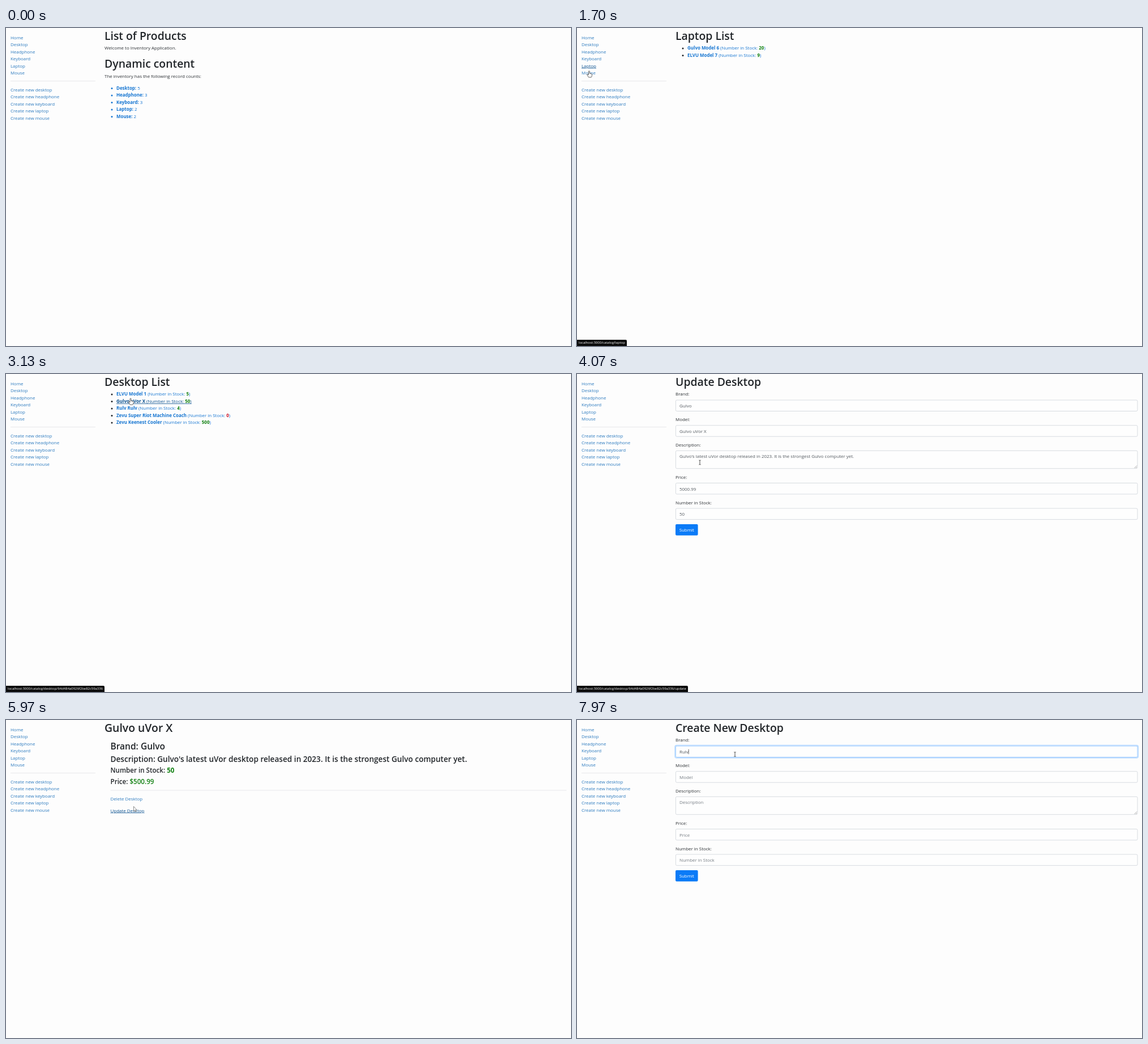
These frames come from a looping animation (998x561 px, 8000 ms). An HTML page:

```html
<!DOCTYPE html>
<html lang="en">
<head>
<meta charset="utf-8">
<title>Inventory</title>
<style>
html, body { margin: 0; width: 100%; height: 100%; overflow: hidden; background: #fdfdfd; }
svg { display: block; width: 100vw; height: 100vh; }
text { font-family: "Open Sans", "Noto Sans", sans-serif; font-size: 7.95px; fill: #2c3034; white-space: pre; }
.h1, .h2, .h3, .h4 { font-weight: 600; fill: #212529; }
.h1 { font-size: 19.4px; }
.h2 { font-size: 15.5px; }
.h3 { font-size: 13.62px; }
.h4 { font-size: 11.6px; }
.nav { fill: #2b7abf; }
.link { fill: #1676d2; }
.hover { fill: #0a5190; text-decoration: underline; }
.value { fill: #53595f; }
.hint { fill: #747b82; }
.b { font-weight: 700; }
.good { fill: #118011; }
.bad { fill: #cc1024; }
.field { fill: #fefefe; stroke: #ced4da; stroke-width: .8; }
.rule { stroke: #e2e3e6; stroke-width: .8; }
#tip { position: absolute; left: 0; bottom: 0; height: 11px; padding: 0 3px; border-radius: 0 2px 0 0;
  background: #0a0a0a; color: #fff; font: 5.93px/11px "Open Sans", "Noto Sans", sans-serif; white-space: pre; }
</style>
</head>
<body>
<svg id="stage" viewBox="0 0 998 561" preserveAspectRatio="none"></svg>
<div id="tip"></div>
<script>
const LOOP = 8000;
const kinds = ["Desktop", "Headphone", "Keyboard", "Laptop", "Mouse"];
const sizes = { h1: 19.4, h2: 15.5, h3: 13.62, h4: 11.6 };
const brand = "Gulvo", model = "Gulvo uVor X";
const about = "Gulvo's latest uVor desktop released in 2023. It is the strongest Gulvo computer yet.";

// Text whose capitals are centred on y.
const text = (x, y, str, cls = "", attrs = "") =>
  `<text x="${x}" y="${y + .355 * (sizes[cls] || 7.95)}" class="${cls}" ${attrs}>${str}</text>`;
const link = (x, y, str, key, cls = "link") => text(x, y, str, cls, `data-key="${key}"`);
const span = (str, cls) => `<tspan class="${cls}">${str}</tspan>`;
const dot = (y, color) => `<circle cx="187" cy="${y + .4}" r="1.5" fill="${color}"/>`;
const rule = (x1, x2, y) => `<path class="rule" d="M${x1} ${y}H${x2}"/>`;

function sidebar() {
  const top = ["Home", ...kinds].map((s, i) => link(8, 17 + 12.45 * i, s, s, "nav"));
  const make = kinds.map((s, i) => link(8, 109 + 12.45 * i, "Create new " + s.toLowerCase(), "new" + s, "nav"));
  return top.join("") + rule(8, 158, 93.6) + make.join("");
}

function home() {
  const counts = [5, 3, 3, 2, 2];
  return text(174, 13.7, "List of Products", "h1") +
    text(174, 35.6, "Welcome to Inventory Application.") +
    text(174, 63.5, "Dynamic content", "h1") +
    text(174, 85.5, "The inventory has the following record counts:") +
    kinds.map((s, i) => {
      const y = 106 + 12.5 * i;
      return dot(y, "#1676d2") + link(195, y, span(s + ":", "b") + " " + counts[i], "count" + s);
    }).join("");
}

function list(kind, items) {
  return text(174, 13.7, kind + " List", "h1") + items.map(([name, stock], i) => {
    const y = 35.6 + 12.5 * i;
    const count = span(stock, "b " + (stock ? "good" : "bad"));
    return dot(y, "#212529") + link(195, y, `${span(name, "b")} (Number in Stock: ${count})`, kind + "Item" + i);
  }).join("");
}

function detail() {
  return text(174, 13.7, model, "h1") +
    text(184.5, 46.5, "Brand: " + brand, "h2") +
    text(184.5, 69, "Description: " + about, "h3") +
    text(184.5, 89.3, "Number in Stock: " + span("50", "b good"), "h4") +
    text(184.5, 108.5, 'Price: <tspan class="good" id="priceShown"></tspan>', "h4") +
    rule(184.5, 990, 124) +
    link(184.5, 139, "Delete Desktop", "delete", "nav") +
    link(184.5, 159.7, "Update Desktop", "update", "nav");
}

function form(id, title, values, cls) {
  const rows = [["Brand", 35.6, 46], ["Model", 80.2, 90.7], ["Description", 125, 135.3],
                ["Price", 182, 192.4], ["Number in Stock", 226.7, 237.1]];
  return text(174, 13.7, title, "h1") + rows.map(([name, labelY, y], i) => {
    const area = i === 2;
    return text(174, labelY, name + ":") +
      `<rect class="field" id="${id}Box${i}" x="174.4" y="${y}" width="815.6" height="${area ? 31.4 : 19.5}" rx="2"/>` +
      (area ? `<path d="M984.5 166L989 161.5M987 166L989 164" stroke="#777" stroke-width=".6"/>` : "") +
      text(181, y + 10.3, values ? values[i] : name, cls, `id="${id}Text${i}"`);
  }).join("") +
    `<rect x="174" y="265" width="39.6" height="19.8" rx="2" fill="#0b7bf7"/>` +
    `<text x="193.8" y="277.8" text-anchor="middle" style="fill:#fff">Submit</text>`;
}

const pages = {
  home: home(),
  Desktop: list("Desktop", [["ELVU Model 1", 5], [model, 50], ["Rulv Rulv", 4],
    ["Zevu Super Riot Machine Coach", 0], ["Zevu Keenest Cooler", 500]]),
  Headphone: list("Headphone", [["Zevu Model 2", 12], ["ELVU Model 3", 8], ["Gulvo Model 1", 30]]),
  Keyboard: list("Keyboard", [["ELVU Model 4", 10], ["Zevu Model 5", 6], ["Rulv Model 2", 3]]),
  Laptop: list("Laptop", [["Gulvo Model 6", 20], ["ELVU Model 7", 9]]),
  Mouse: list("Mouse", [["Zevu Model 8", 15], ["Rulv Model 9", 4]]),
  detail: detail(),
  edit: form("edit", "Update Desktop", [brand, model, about, "5000.99", "50"], "value"),
  create: form("create", "Create New Desktop", null, "hint")
};

const pointers = {
  arrow: `<path d="M0 0V8.3L1.9 6.6L3.2 9.5L4.4 8.9L3.2 6.1H5.6Z" fill="#fff" stroke="#444" stroke-width=".6"/>`,
  hand: `<path d="M-1 1Q-1 0 0 0T1 1V4.4L4 5Q5 5.3 5 6.4V8.2Q4.7 10 3.7 11.2H-.8Q-2.3 9.2-3.7 6.6Q-3.6 5.5-2.4 6L-1 7.1Z" fill="#fff" stroke="#222" stroke-width=".7"/>`,
  beam: `<path d="M-1.6-4Q0-4 0-3Q0-4 1.6-4M0-3V3M-1.6 4Q0 4 0 3Q0 4 1.6 4" fill="none" stroke="#222" stroke-width=".8"/>`
};

const group = (map, prefix) => Object.entries(map)
  .map(([k, v]) => `<g id="${prefix}${k}" display="none">${v}</g>`).join("");
const $ = id => document.getElementById(id);
$("stage").innerHTML = sidebar() + group(pages, "page") +
  `<rect id="ring" x="173.2" width="818" height="21.9" rx="2.8" fill="none" stroke="#bcdcff" stroke-width="1.9"/>` +
  `<rect id="caret" width=".7" height="8.6" fill="#222"/>` +
  `<g id="cursor">${group(pointers, "pointer")}</g>`;

const root = "localhost:3000/catalog", item = root + "/desktop/64d484a0926f2be82c59a336";
const tipFor = kind => root + "/" + kind.toLowerCase();

// time, page, hovered link, status text, pointer
const steps = [
  [0, "home", "", "", ""],
  [30, "home", "", "", "arrow"],
  [570, "home", "Desktop", tipFor("Desktop"), "hand"],
  [800, "Desktop", "Desktop", tipFor("Desktop"), "hand"],
  [940, "Desktop", "Headphone", tipFor("Headphone"), "hand"],
  [1170, "Headphone", "Headphone", tipFor("Headphone"), "hand"],
  [1270, "Headphone", "Keyboard", tipFor("Keyboard"), "hand"],
  [1400, "Keyboard", "Keyboard", tipFor("Keyboard"), "hand"],
  [1500, "Keyboard", "Laptop", tipFor("Laptop"), "hand"],
  [1630, "Laptop", "Laptop", tipFor("Laptop"), "hand"],
  [1710, "Laptop", "Mouse", tipFor("Mouse"), "hand"],
  [1830, "Mouse", "Mouse", tipFor("Mouse"), "hand"],
  [1990, "Mouse", "Home", root, "hand"],
  [2130, "home", "Home", root, "hand"],
  [2190, "home", "", root, "arrow"],
  [2400, "home", "", "", "arrow"],
  [2490, "home", "countDesktop", tipFor("Desktop"), "hand"],
  [2700, "Desktop", "", tipFor("Desktop"), "arrow"],
  [3000, "Desktop", "DesktopItem1", item, "hand"],
  [3370, "detail", "", item, "arrow"],
  [3610, "detail", "update", item + "/update", "hand"],
  [3870, "edit", "", item + "/update", "beam"],
  [4200, "edit", "", "", "beam"],
  [5270, "edit", "", "", "arrow"],
  [5600, "detail", "", "", "arrow"],
  [5950, "detail", "update", "", "arrow"],
  [6000, "detail", "update", item + "/update", "hand"],
  [6170, "detail", "", item + "/update", "arrow"],
  [6360, "detail", "newDesktop", tipFor("Desktop") + "/create", "hand"],
  [6570, "create", "newDesktop", tipFor("Desktop") + "/create", "hand"],
  [6780, "create", "", tipFor("Desktop") + "/create", "arrow"],
  [6950, "create", "", "", "beam"]
];

// time, x, y of the pointer's hot spot
const path = [
  [30, 945, 120], [300, 440, 75], [570, 30, 31], [800, 23, 29], [1000, 26, 41], [1170, 26, 42],
  [1290, 25, 53], [1400, 25, 54], [1520, 23, 66], [1630, 23, 67], [1730, 21, 78], [1830, 21, 79],
  [2010, 18, 17], [2130, 18, 17], [2300, 154, 47], [2500, 210, 104], [2700, 212, 105],
  [3010, 219, 47], [3130, 220, 43], [3380, 220, 44], [3630, 216, 157], [4070, 217, 156],
  [4330, 207, 202], [5030, 207, 203], [5300, 196, 274], [5650, 196, 274], [5970, 225.5, 152.5],
  [6110, 222, 156], [6400, 46, 108], [6640, 45, 109], [7080, 276, 58], [7250, 279, 60.5], [8000, 279, 60.5]
];

function pointerAt(t) {
  const i = path.findIndex(p => p[0] > t);
  if (i < 1) return path[0].slice(1);
  const [t0, x0, y0] = path[i - 1], [t1, x1, y1] = path[i];
  const k = (t - t0) / (t1 - t0), e = k * k * (3 - 2 * k);
  return [x0 + (x1 - x0) * e, y0 + (y1 - y0) * e];
}

const show = (el, on) => el.setAttribute("display", on ? "inline" : "none");

function focusField(id, row, y, chars) {
  const label = $(id + "Text" + row);
  const width = chars ? label.getSubStringLength(0, chars) : 0;
  $("ring").setAttribute("y", y - 1.2);
  $("caret").setAttribute("x", 181 + width);
  $("caret").setAttribute("y", y + 5.6);
}

function draw(t) {
  const [, page, hover, tip, pointer] = steps.findLast(s => t >= s[0]);
  for (const name in pages) show($("page" + name), name === page);
  for (const name in pointers) show($("pointer" + name), name === pointer);
  document.querySelectorAll("[data-key]").forEach(el => el.classList.toggle("hover", el.dataset.key === hover));
  $("tip").textContent = tip;
  $("tip").style.display = tip ? "block" : "none";
  $("cursor").setAttribute("transform", `translate(${pointerAt(t)})`);

  const cut = t >= 4800;
  $("editText3").textContent = cut ? "500.99" : "5000.99";
  $("priceShown").textContent = t >= 5600 ? "$500.99" : "$5000.99";

  const typed = "Rulv".slice(0, Math.max(0, Math.floor((t - 7430) / 120)));
  const brandText = $("createText0");
  brandText.textContent = typed || "Brand";
  brandText.setAttribute("class", typed ? "value" : "hint");

  const editing = page === "edit" && t >= 4400, creating = page === "create" && t >= 7200;
  show($("ring"), editing || creating);
  show($("caret"), editing || creating);
  $("editBox3").style.stroke = editing ? "#80bdff" : "";
  $("createBox0").style.stroke = creating ? "#80bdff" : "";
  if (editing) focusField("edit", 3, 192.4, cut ? 3 : 4);
  if (creating) focusField("create", 0, 46, typed.length);
}

const start = performance.now();
function tick() {
  draw((performance.now() - start) % LOOP);
  requestAnimationFrame(tick);
}
tick();
</script>
</body>
</html>
```
